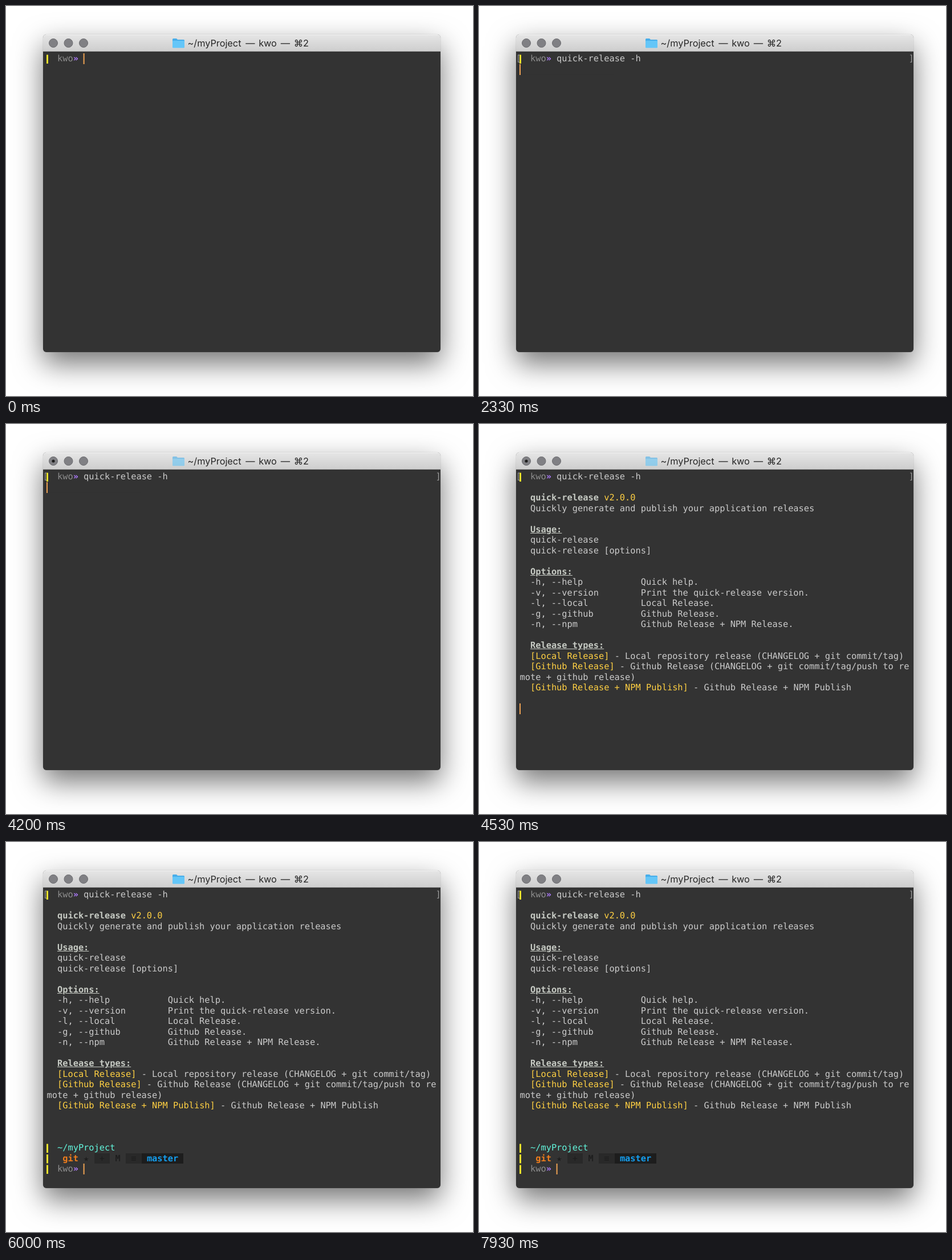
These frames come from a looping animation (819 px wide and 684 px high, 8 s). An HTML page:

```html
<!DOCTYPE html>
<html lang="en">
<head>
<meta charset="utf-8">
<title>Terminal: quick-release help</title>
<style>
  html, body { margin: 0; width: 100%; height: 100%; overflow: hidden; background: #fff; }
  body { position: relative; }

  .window {
    position: absolute; left: 65px; top: 50px; width: 697px; height: 557px;
    border-radius: 6px; background: #333;
    box-shadow: 0 0 1px rgba(0, 0, 0, .5), 0 20px 50px rgba(0, 0, 0, .55);
  }
  .bar {
    height: 29px; border-bottom: 1px solid #a8a8a8; border-radius: 6px 6px 0 0;
    background: linear-gradient(#e6e6e6, #cecece);
    box-shadow: inset 0 1px #f2f2f2;
  }
  .chrome { position: absolute; left: 0; top: 0; }
  .title { font: 16.3px Inter, "DejaVu Sans", sans-serif; fill: #262626; text-rendering: geometricPrecision; }
  .buttons { fill: #808084; stroke: #6b6b6f; }
  .yellow-bars { fill: #ebe02c; }

  .screen {
    --cw: 9.23px; --lh: 18.5px;
    position: absolute; left: 71.5px; top: 83.25px;
    font: 15.33px/18.5px "DejaVu Sans Mono", monospace; color: #cbcbcb;
    text-rendering: geometricPrecision; font-variant-ligatures: none;
  }
  pre { position: absolute; left: 0; top: 0; margin: 0; font: inherit; }
  .output { top: calc(2 * var(--lh)); }
  .prompt { top: calc(24 * var(--lh)); }
  b { color: #c6cac3; }
  u { font-weight: bold; color: #c6cac3; }
  i { font-style: normal; color: #ffd043; }
  .user { color: #8d8d8d; }
  .arrow { color: #b07cff; font-weight: bold; }
  .path { color: #62f5dc; }
  .git { color: #ef7d1c; font-weight: bold; }
  .dim { color: #1e1e1e; }
  .chip { color: #1e1e1e; background: #292929; }
  .branch { color: #149ff0; background: #1d1d1d; font-weight: bold; }
  .bracket { position: absolute; top: 0; color: #999; }

  .caret {
    position: absolute; left: 0; top: 0; width: 165px; height: 18.5px;
    transform: translate(calc(var(--col) * var(--cw)), calc(var(--row) * var(--lh)));
    animation: move 8s step-end infinite;
  }
  /* The caret box hides the part of the command that is not typed yet. */
  .caret { background: #333; }
  .caret::before {
    content: ""; position: absolute; left: -.5px; top: 0; width: 1.5px; height: 18.5px;
    background: #eda253; animation: blink 8s step-end infinite;
  }

  .entered { animation: enter 8s step-end infinite; }
  .output { animation: print 8s step-end infinite; }
  .done { animation: finish 8s step-end infinite; }
  .busy { animation: busy 8s step-end infinite; }
  .folder { animation: fade-folder 8s step-end infinite; }

  @keyframes move {
    0% { --col: 7; --row: 0; }
    .85% { --col: 8; }
    1.62% { --col: 9; }
    2.48% { --col: 10; }
    3.32% { --col: 11; }
    4.11% { --col: 12; }
    10.85% { --col: 13; }
    11.62% { --col: 14; }
    12.48% { --col: 16; }
    13.32% { --col: 17; }
    14.11% { --col: 19; }
    14.98% { --col: 20; }
    16.61% { --col: 22; }
    20.82% { --col: 23; }
    24.98% { --col: 0; --row: 1; }
    56.6% { --col: 0; --row: 22; }
    59.1% { --col: 7; --row: 26; }
    100% { --col: 7; --row: 26; }
  }
  @keyframes blink {
    0% { opacity: 1; }
    37.48% { opacity: 1; animation-timing-function: steps(4, jump-start); }
    40.82% { opacity: 0; }
    49.98% { opacity: 0; animation-timing-function: steps(4, jump-start); }
    53.3%, 100% { opacity: 1; }
  }
  @keyframes enter { 0% { opacity: 0; } 24.98%, 100% { opacity: 1; } }
  @keyframes print { 0% { opacity: 0; } 56.6%, 100% { opacity: 1; } }
  @keyframes finish { 0% { opacity: 0; } 59.1%, 100% { opacity: 1; } }
  @keyframes busy { 0% { opacity: 0; } 29.98% { opacity: 1; } 59.1%, 100% { opacity: 0; } }
  @keyframes fade-folder { 0% { opacity: 1; } 29.98% { opacity: .6; } 59.1%, 100% { opacity: 1; } }
</style>
</head>
<body>
<div class="window"><div class="bar"></div></div>

<div class="screen">
  <pre>  <span class="user">kwo</span><span class="arrow">»</span> quick-release -h</pre>
  <div class="caret"></div>
  <div class="entered">
    <span class="bracket" style="left:-7px">[</span>
    <span class="bracket" style="left:682px">]</span>
  </div>
  <pre class="output">  <b>quick-release</b> <i>v2.0.0</i>
  Quickly generate and publish your application releases

  <u>Usage:</u>
  quick-release
  quick-release [options]

  <u>Options:</u>
  -h, --help           Quick help.
  -v, --version        Print the quick-release version.
  -l, --local          Local Release.
  -g, --github         Github Release.
  -n, --npm            Github Release + NPM Release.

  <u>Release types:</u>
  <i>[Local Release]</i> - Local repository release (CHANGELOG + git commit/tag)
  <i>[Github Release]</i> - Github Release (CHANGELOG + git commit/tag/push to re
mote + github release)
  <i>[Github Release + NPM Publish]</i> - Github Release + NPM Publish</pre>
  <pre class="prompt done">  <span class="path">~/myProject</span>
   <span class="git">git</span> <span class="dim">★</span> <span class="chip"> + </span> <b class="dim">M</b> <span class="chip"> ≡ </span><span class="branch"> master </span>
  <span class="user">kwo</span><span class="arrow">»</span></pre>
</div>

<svg class="chrome" width="819" height="684">
  <g class="buttons">
    <circle cx="83" cy="65" r="7.5"/>
    <circle cx="109.5" cy="65" r="7.5"/>
    <circle cx="136" cy="65" r="7.5"/>
  </g>
  <circle class="busy" cx="83" cy="65" r="2.6" fill="#1d1d1d"/>
  <g class="folder">
    <path d="M292 72V58.500q0-1.500 1.500-1.500h5.500l2 2h10.500q1.500 0 1.500 1.500V72z" fill="#48aeea"/>
    <rect x="292" y="61" width="21" height="12.500" rx="1.200" fill="#64c6f8"/>
  </g>
  <g class="title">
    <text x="318.500" y="71">~/myProject</text>
    <text x="428.500" y="71" text-anchor="middle">—</text>
    <text x="459" y="71" text-anchor="middle">kwo</text>
    <text x="490" y="71" text-anchor="middle">—</text>
    <text x="531" y="71" text-anchor="end">⌘2</text>
  </g>
  <g class="yellow-bars">
    <rect x="71" y="85.500" width="3" height="15.500"/>
    <g class="done">
      <rect x="71" y="529.500" width="3" height="15.500"/>
      <rect x="71" y="548" width="3" height="15.500"/>
      <rect x="71" y="566.500" width="3" height="15.500"/>
    </g>
  </g>
</svg>
</body>
</html>
```
